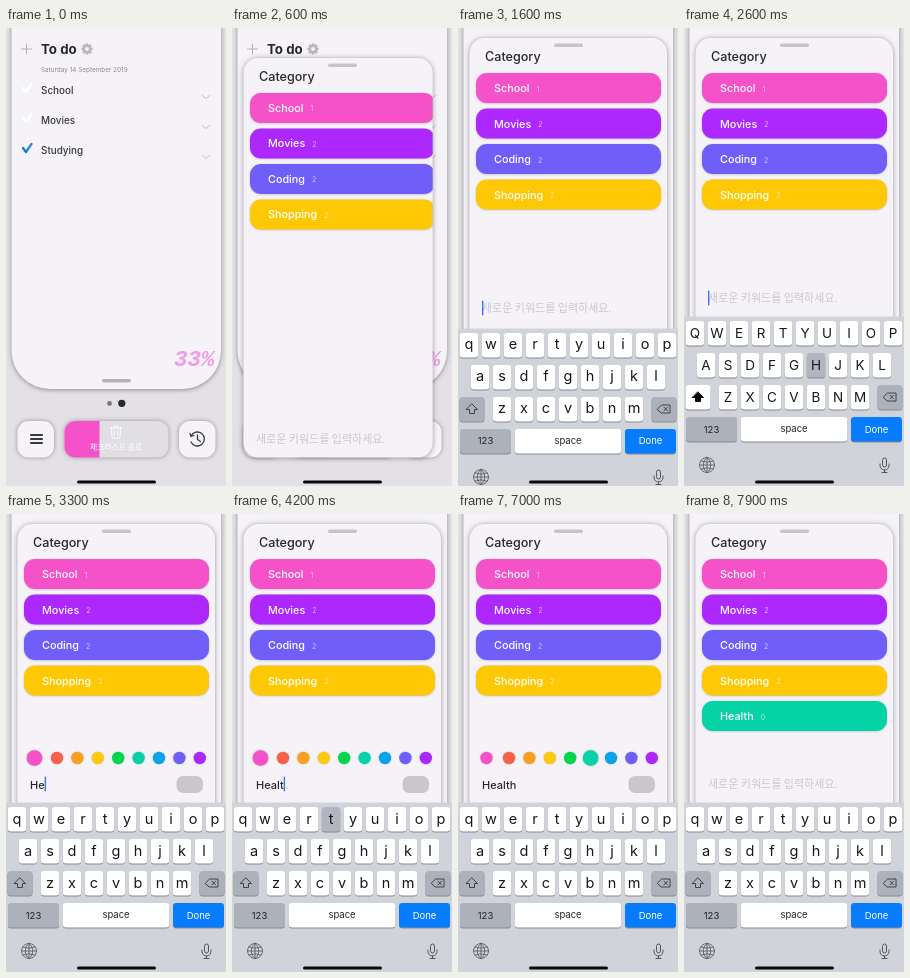
Write an HTML page with a canvas that moves like this. It is 220 by 458 pixels and loops after 8 s.

```html
<!DOCTYPE html>
<html lang="en">
<head>
<meta charset="utf-8">
<title>Checklist categories</title>
<style>
html, body { margin: 0; width: 100%; height: 100%; overflow: hidden; background: #e3e1e5; }
canvas { display: block; width: 220px; height: 458px; }
</style>
</head>
<body>
<canvas id="stage"></canvas>
<script>
const W = 220, H = 458, LOOP = 8000;
const canvas = document.getElementById('stage');
const ctx = canvas.getContext('2d');
const dpr = window.devicePixelRatio || 1;
canvas.width = W * dpr;
canvas.height = H * dpr;

const SANS = 'Inter, sans-serif';
const KOREAN = '"Noto Sans CJK KR", "Noto Sans CJK", sans-serif';
const PAPER = '#f5f3f7', INK = '#29282d', TEAL = '#05d2a6', PINK = '#f551c8';
const LIST = [
  ['School', 1, PINK], ['Movies', 2, '#ac28fd'], ['Coding', 2, '#6f5ef7'],
  ['Shopping', 2, '#fec804'], ['Health', 0, TEAL]
];
const SWATCHES = [PINK, '#fa5f4b', '#fb9f22', '#fcca0d', '#03d64a', TEAL, '#0aa2e8', '#6f5ef7', '#ac28fd'];

const OPEN = 250, FOCUS = 1300, SHIFT = 2100, PICK = 5850, SUBMIT = 7200;
const WORD = 'Health';
const PRESSES = [2540, 2980, 3380, 3740, 4090, 4400];
const LETTER_DELAY = 100, PRESS_TIME = 120;

const clamp = v => Math.max(0, Math.min(1, v));
const progress = (t, start, length) => clamp((t - start) / length);
const easeOut = u => 1 - (1 - u) ** 3;
const mix = (a, b, u) => a + (b - a) * u;

function box(x, y, w, h, r, fill) {
  ctx.beginPath();
  ctx.roundRect(x, y, w, h, r);
  ctx.fillStyle = fill;
  ctx.fill();
}

function disc(x, y, r, fill) {
  ctx.beginPath();
  ctx.arc(x, y, r, 0, Math.PI * 2);
  ctx.fillStyle = fill;
  ctx.fill();
}

function withShadow(blur, dy, color, draw) {
  ctx.save();
  ctx.shadowBlur = blur * dpr;
  ctx.shadowOffsetY = dy * dpr;
  ctx.shadowColor = color;
  draw();
  ctx.restore();
}

function text(str, x, y, font, fill, align = 'left') {
  ctx.font = font;
  ctx.fillStyle = fill;
  ctx.textAlign = align;
  ctx.textBaseline = 'alphabetic';
  ctx.fillText(str, x, y);
}

// Strokes SVG path data around a local origin.
function icon(x, y, path, color, width = 1, fill) {
  ctx.save();
  ctx.translate(x, y);
  ctx.lineCap = ctx.lineJoin = 'round';
  ctx.lineWidth = width;
  ctx.strokeStyle = color;
  const shape = new Path2D(path);
  if (fill) {
    ctx.fillStyle = fill;
    ctx.fill(shape);
  }
  ctx.stroke(shape);
  ctx.restore();
}

function gear(x, y) {
  ctx.save();
  ctx.translate(x, y);
  ctx.fillStyle = '#b9b7bc';
  for (let i = 0; i < 8; i++) {
    ctx.rotate(Math.PI / 4);
    ctx.fillRect(-1.3, -5.6, 2.6, 3);
  }
  disc(0, 0, 4.4, '#b9b7bc');
  disc(0, 0, 1.9, PAPER);
  ctx.restore();
}

function drawTodo() {
  ctx.fillStyle = '#e3e1e5';
  ctx.fillRect(0, 0, W, H);
  withShadow(4, 1, 'rgba(70,65,75,.55)', () => box(5.5, -60, 209.5, 421, 38, PAPER));

  icon(20.5, 21, 'M-5 0H5M0-5V5', '#aaa8ad', 0.9);
  text('To do', 35, 26, `700 13.3px ${SANS}`, INK);
  gear(81, 21);
  text('Saturday 14 September 2019', 35, 44, `400 6.4px ${SANS}`, '#8c8a90');

  const gradient = ctx.createLinearGradient(-4, 3, 5, -5);
  gradient.addColorStop(0, '#2c5fd0');
  gradient.addColorStop(0.55, '#16a5e0');
  gradient.addColorStop(1, '#8a5bd0');
  ['School', 'Movies', 'Studying'].forEach((label, i) => {
    const y = 66 + 30 * i;
    icon(21, y - 6, 'M-4 0L-1 4L4.500-4', i === 2 ? gradient : '#fff', 2.4);
    text(label, 35, y, `500 9.9px ${SANS}`, '#39383d');
    icon(200, y + 3, 'M-3.500-1.500L0 1.500L3.500-1.500', '#b3b1b6', 0.8);
  });

  text('33%', 168, 338, 'italic 700 22.5px "Liberation Mono", monospace', '#f29be6');
  box(96, 351, 29, 3.5, 1.75, '#b4b1b7');
  disc(103.5, 375.5, 2.4, '#79777d');
  disc(115.8, 375.3, 3.6, '#29282f');

  const shade = 'rgba(70,65,75,.5)';
  for (const x of [11.5, 173]) {
    withShadow(4, 0, shade, () => box(x, 393, 36.5, 36.5, 11, PAPER));
  }
  icon(30, 411, 'M-5-4H6M-5 0H6M-5 4H6', '#3a393e', 2.1);
  icon(191.500, 411, 'M-6.500-3A7 7 0 1 1-6.500 3M-7.500-5.500L-6.500-2.500L-3.500-3.500M0-4V0.500L3 2.500', '#3a393e', 1.3);

  withShadow(4, 0, shade, () => box(58.5, 393, 104, 36.5, 11, '#e1dfe4'));
  ctx.save();
  ctx.beginPath();
  ctx.roundRect(58.5, 393, 104, 36.5, 11);
  ctx.clip();
  ctx.fillStyle = PINK;
  ctx.fillRect(58, 392, 35.5, 39);
  ctx.restore();
  icon(110, 404, 'M-6-4H6M-2-4V-6H2V-4M-4.500-4L-4 6H4L4.500-4M-1.700-1V3.500M1.700-1V3.500', '#fff', 0.9);
  text('체크리스트 종료', 110, 422, `500 7.8px ${KOREAN}`, '#fff', 'center');
}

function drawList(t) {
  LIST.forEach(([label, count, color], i) => {
    const shown = i === 4 ? easeOut(progress(t, SUBMIT, 280)) : 1;
    if (!shown) return;
    const y = 45 + 35.5 * i;
    ctx.save();
    ctx.globalAlpha *= shown;
    withShadow(2, 0.5, 'rgba(60,50,70,.3)', () => box(18, y, 185, 30, 11, color));
    text(label, 36, y + 19, `500 10.8px ${SANS}`, '#fff');
    const end = 36 + ctx.measureText(label).width;
    text(count, end + 7, y + 18.5, `400 7px ${SANS}`, 'rgba(255,255,255,.65)');
    ctx.restore();
  });
}

function drawSwatches(t) {
  const swap = easeOut(progress(t, PICK + 200, 220));
  SWATCHES.forEach((color, i) => {
    const selected = i === 0 ? 1 - swap : i === 5 ? swap : 0;
    const x = i ? 51 + 20.4 * (i - 1) : 28.5;
    ctx.save();
    if (i === 5 && t >= PICK && t < PICK + 200) ctx.globalAlpha *= 0.4;
    withShadow(2, 0, `rgba(60,50,70,${0.2 + 0.2 * selected})`, () => disc(x, 244, mix(6.2, 7.8, selected), color));
    ctx.restore();
  });
}

function drawInput(t, lift) {
  const y = 411 - 141 * lift;
  const typed = t < SUBMIT ? PRESSES.filter(p => t >= p + LETTER_DELAY).length : 0;
  const str = WORD.slice(0, typed);
  if (typed) {
    ctx.save();
    ctx.globalAlpha *= progress(t, PRESSES[0] + LETTER_DELAY, 200);
    drawSwatches(t);
    const pressed = t > SUBMIT - 150;
    box(170.5, y - 8, 26.500, 17, 6.5, pressed ? '#dfdde2' : '#c9c7cc');
    ctx.restore();
    text(str, 24, y + 4.5, `500 11px ${SANS}`, INK);
  } else {
    text('새로운 키워드를 입력하세요.', 24, y + 4, `400 11px ${KOREAN}`, '#c9c7cc');
  }
  if (t < FOCUS) return;
  ctx.font = `500 11px ${SANS}`;
  const caretX = 24 + ctx.measureText(str).width;
  const marks = [FOCUS, ...PRESSES.map(p => p + LETTER_DELAY), SUBMIT];
  const last = Math.max(...marks.filter(m => m <= t));
  if ((t - last) % 1000 < 500) box(caretX, y - 7.5, 1.4, 15, 0.7, '#3f72f0');
}

function drawSheet(t, lift) {
  const open = easeOut(progress(t, OPEN, 560));
  if (!open) return;
  const top = mix(393, 10, open), width = mix(36.5, 197.5, open);
  const bounds = [11.5, top, width, 429.5 - top, mix(11, 15, open)];
  withShadow(5, 0.5, 'rgba(60,55,65,.5)', () => box(...bounds, PAPER));
  ctx.save();
  ctx.beginPath();
  ctx.roundRect(...bounds);
  ctx.clip();
  ctx.globalAlpha = progress(open, 0.45, 0.5);
  ctx.translate(0, top - 10);
  box(96, 15.5, 29, 3.5, 1.75, '#c6c4c9');
  text('Category', 27, 33, `500 12.6px ${SANS}`, INK);
  drawList(t);
  ctx.translate(0, 10 - top);
  drawInput(t, lift);
  ctx.restore();
}

function key(x, y, w, fill) {
  withShadow(0, 1, 'rgba(110,113,122,.75)', () => box(x - w / 2, y - 12, w, 24.5, 3.2, fill));
}

function drawKeyboard(t, lift) {
  if (!lift) return;
  const upper = t >= SHIFT && t < PRESSES[0] + PRESS_TIME;
  const press = PRESSES.findIndex(p => t >= p && t < p + PRESS_TIME);
  const down = press < 0 ? '' : WORD[press].toLowerCase();
  const GREY = '#adb1bc';
  ctx.save();
  ctx.translate(0, 170 * (1 - lift));
  ctx.fillStyle = '#d1d3da';
  ctx.fillRect(0, 288.500, W, 170);

  [['qwertyuiop', 11, 305], ['asdfghjkl', 22, 337], ['zxcvbnm', 44, 369]].forEach(([row, left, y]) => {
    [...row].forEach((c, i) => {
      const x = left + 22 * i;
      key(x, y, 18.4, c === down ? '#b2b5bf' : '#fff');
      text(upper ? c.toUpperCase() : c, x, y + (upper ? 5 : 4.5), `400 ${upper ? 13.5 : 14.5}px ${SANS}`, '#18181b', 'center');
    });
  });

  key(14, 369, 25, upper ? '#fff' : GREY);
  icon(14, 369, 'M0-5L5.500 0.500H2.500V4.500H-2.500V0.500H-5.500Z', upper ? '#000' : '#33363d', 0.9, upper && '#000');
  key(206, 369, 25, GREY);
  icon(206, 369, 'M-6.500 0L-2.500-4H6V4H-2.500ZM0-1.800L3.500 1.800M3.500-1.800L0 1.800', '#33363d', 0.9);

  const label = `400 9.5px ${SANS}`;
  key(27.5, 401, 51, GREY);
  text('123', 27.5, 404.5, label, '#222428', 'center');
  key(110, 401, 106.5, '#fff');
  text('space', 110, 404, label, '#222428', 'center');
  key(192.5, 401, 51, '#087cff');
  text('Done', 192.5, 404.5, label, '#fff', 'center');

  icon(23, 437, 'M-7.500 0A7.500 7.500 0 1 0 7.500 0A7.500 7.500 0 1 0-7.500 0H7.500M0-7.500V7.500M0-7.500C-5-4-5 4 0 7.500C5 4 5-4 0-7.500M-6-4Q0-1.500 6-4M-6 4Q0 1.500 6 4', '#50545c', 0.8);
  icon(200.500, 437, 'M-2-5A2 2 0 0 1 2-5V0A2 2 0 0 1-2 0ZM-4.500-1V0.500A4.500 4.500 0 0 0 4.500 0.500V-1M0 5V7.500M-2.500 7.500H2.500', '#50545c', 1);
  ctx.restore();
}

function frame(now) {
  const t = now % LOOP;
  const lift = easeOut(progress(t, FOCUS, 513));
  ctx.setTransform(dpr, 0, 0, dpr, 0, 0);
  drawTodo();
  drawSheet(t, lift);
  drawKeyboard(t, lift);
  box(71, 452.5, 79, 3, 1.5, '#09090b');
  requestAnimationFrame(frame);
}
requestAnimationFrame(frame);
</script>
</body>
</html>
```
